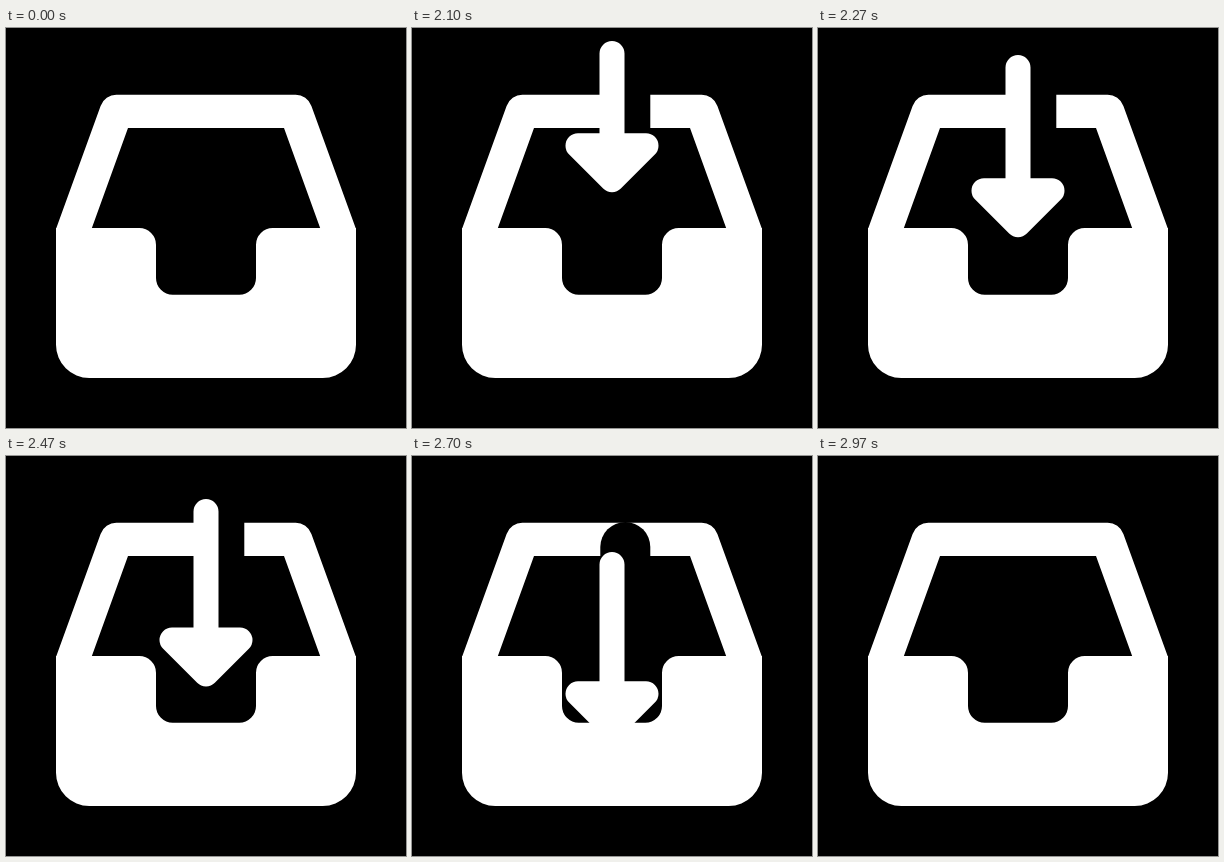
Animation, 400 px wide and 400 px high, one loop 3.02 s. Source, as an HTML page:

```html
<!DOCTYPE html>
<html lang="en">
<head>
<meta charset="utf-8">
<title>Inbox arrow</title>
<style>
  html, body { margin: 0; width: 100%; height: 100%; overflow: hidden; background: #000; }
  svg { display: block; }
</style>
</head>
<body>
<svg width="400" height="400" viewBox="0 0 400 400" fill="#fff" stroke-linecap="round" stroke-linejoin="round">
  <!-- back of the tray -->
  <path fill-rule="evenodd" d="M50 201 L94.6 77.9 A16.7 16.7 0 0 1 110.6 66.7 H289.4 A16.7 16.7 0 0 1 305.4 77.9 L350 201 Z
    M122 100 L85.5 201 H314.5 L278 100 Z"/>
  <path id="gap" stroke="#000" stroke-width="50"/>
  <!-- front of the tray -->
  <path d="M50 200 H133.3 A16.7 16.7 0 0 1 150 216.7 V250 A16.7 16.7 0 0 0 166.7 266.7 H233.3 A16.7 16.7 0 0 0 250 250
    V216.7 A16.7 16.7 0 0 1 266.7 200 H350 V316.7 A33.3 33.3 0 0 1 316.7 350 H83.3 A33.3 33.3 0 0 1 50 316.7 Z"/>
  <!-- the arrow disappears below the tray's slot -->
  <svg width="400" height="267">
    <path id="arrow" stroke="#fff" stroke-width="25"/>
  </svg>
</svg>
<script>
  const LOOP = 3020, SHOW = 2020, HIDE = 2970, STEP = 25;
  const gap = document.getElementById('gap');
  const arrow = document.getElementById('arrow');
  const start = performance.now();

  // Slow drift, then an accelerating drop
  function arrowTop(t) {
    return t < 2530 ? 7 + 0.08 * (t - 2025) : 47 + 49 * ((t - 2500) / 200) ** 3;
  }

  function arrowLength(t) {
    return 188.3 - 80.3 * Math.exp(-0.0103 * (t - 2025));
  }

  function draw(now) {
    const time = Math.max(0, now - start) % LOOP;
    const visible = time >= SHOW && time < HIDE;
    if (visible) {
      const t = Math.floor((time + 5) / STEP) * STEP;
      const top = arrowTop(t) + 12.5;
      const tip = top + arrowLength(t) - 25;
      gap.setAttribute('d', `M213.3 ${top - 17.5} V${tip}`);
      arrow.setAttribute('d', `M200 ${top} V${tip} L166 ${tip - 34} H234 L200 ${tip}`);
    }
    gap.style.display = arrow.style.display = visible ? '' : 'none';
    requestAnimationFrame(draw);
  }
  draw(start);
</script>
</body>
</html>
```
